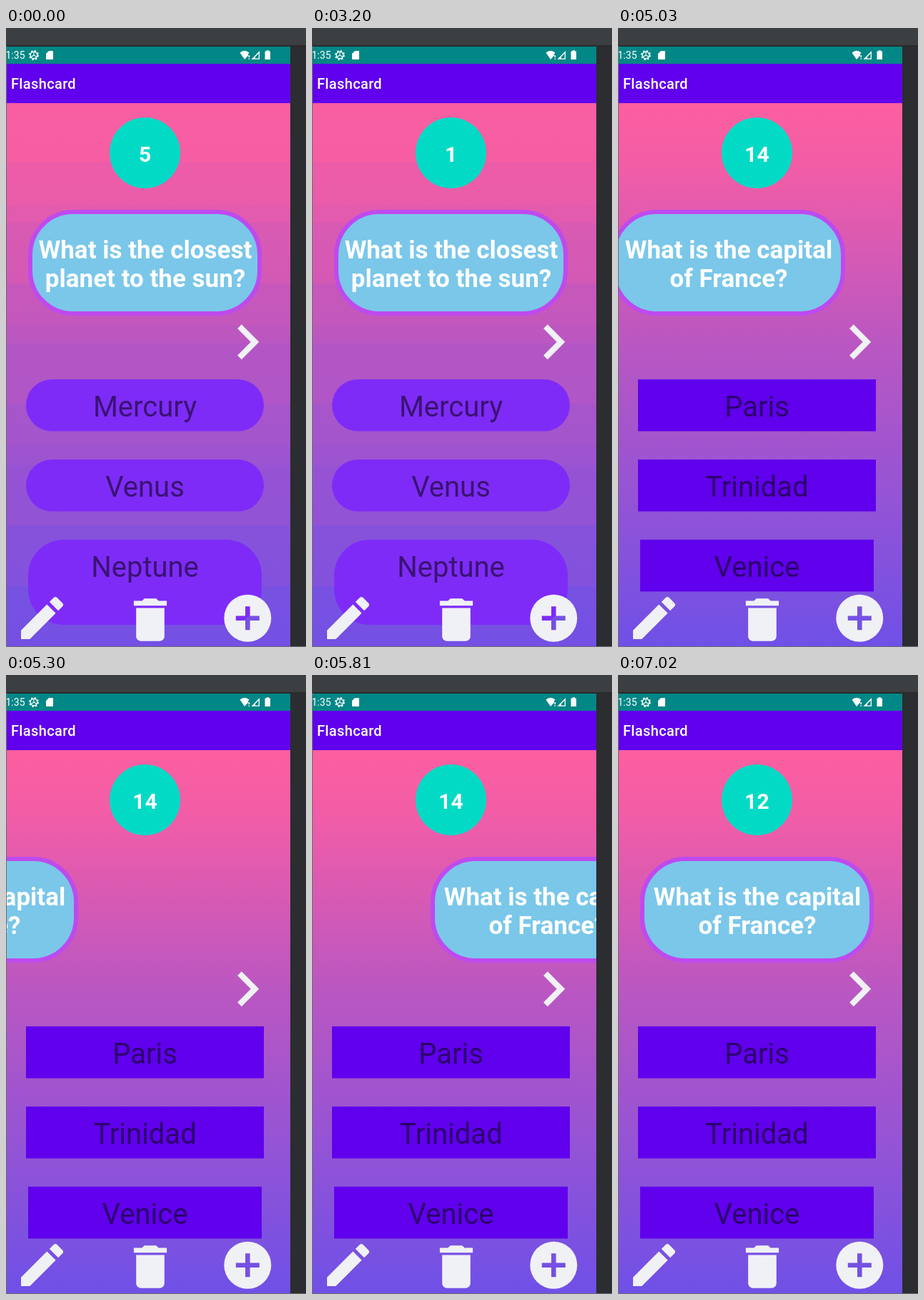
These frames come from a looping animation (420 by 865 pixels, 8000 ms). An HTML page:

```html
<!DOCTYPE html>
<html lang="en">
<head>
<meta charset="utf-8">
<title>Flashcard quiz</title>
<style>
  html, body { margin: 0; width: 100%; height: 100%; overflow: hidden; background: #2b2d30; }
  svg { display: block; width: 100%; height: 100%; }
  text { font-family: Roboto, sans-serif; }
  .mid { text-anchor: middle; }
  .bold { font-weight: 700; fill: #fff; }
  .answer { font-size: 40px; fill: #000; fill-opacity: .54; }
</style>
</head>
<body>
<svg viewBox="0 0 420 865">
  <defs>
    <linearGradient id="sky" gradientUnits="userSpaceOnUse" x1="0" y1="105" x2="0" y2="864"></linearGradient>
    <clipPath id="screen"><rect x="1" y="26" width="397" height="838"/></clipPath>
  </defs>

  <rect width="420" height="865" fill="#2b2d30"/>
  <rect width="420" height="24" fill="#3c3f41"/>
  <rect y="24" width="420" height="2" fill="#2a2a2b"/>

  <g clip-path="url(#screen)">
    <rect y="105" width="398" height="760" fill="url(#sky)"/>
    <g id="bands" opacity=".75"></g>

    <rect y="26" width="398" height="24" fill="#018786"/>
    <rect y="50" width="398" height="55" fill="#6000ec"/>
    <text x="7" y="85" font-size="20" font-weight="500" fill="#fff" letter-spacing=".35">Flashcard</text>

    <g fill="#fff">
      <text x="26.5" y="43" font-size="14" text-anchor="end">1:35</text>
      <g fill="none" stroke="#fff">
        <circle cx="39" cy="38" r="4.8" stroke-width="1.4"/>
        <circle cx="39" cy="38" r="6.2" stroke-width="1.6" stroke-dasharray="2.4 2.47"/>
        <path d="M39 38V33.500M39 38L35 40.500M39 38L43 40.500" stroke-width="1.100"/>
      </g>
      <path d="M60 32H65Q66 32 66 33V43Q66 44 65 44H57Q56 44 56 43V36Z"/>
      <path d="M327.500 34.500Q334 29 340.500 34.500L339 36.500V38.500L334 44Z"/>
      <path d="M339.500 38h1.500v3h-1.500zM339.500 42.200h1.500v1.500h-1.500z"/>
      <path d="M343.500 43.800L355 32V43.800ZM349 42.500H353.700V35.500L349 40.300Z" fill-rule="evenodd"/>
      <path d="M364.500 31.200h3.500v1.300h2v11.500h-7.500v-11.500h2z"/>
    </g>

    <circle cx="194.500" cy="174.500" r="49.500" fill="#03dac5"/>
    <text id="count" class="mid bold" x="194.500" y="186.500" font-size="30"></text>

    <g id="card">
      <rect x="34" y="257" width="321" height="142" rx="60" fill="#7ac7e9" stroke="#be4aee" stroke-width="6"/>
      <g class="mid bold" font-size="35">
        <text id="line0" x="195" y="322"></text>
        <text id="line1" x="195" y="362.300"></text>
      </g>
    </g>

    <g id="answers"></g>

    <g fill="#f0f1f5" fill-rule="evenodd">
      <path transform="translate(289 389.800) scale(4.080)" d="M10 6L8.590 7.410 13.170 12l-4.580 4.590L10 18l6-6z"/>
      <path transform="translate(11.200 785.200) scale(3.280)" d="M3 17.250V21h3.750L17.810 9.940l-3.750-3.750zM20.710 7.040c.390-.390.390-1.020 0-1.410l-2.340-2.340c-.390-.390-1.020-.390-1.410 0l-1.830 1.830 3.750 3.750z"/>
      <path transform="translate(162.400 787.400) scale(3.300)" d="M6 19c0 1.100.900 2 2 2h8c1.100 0 2-.900 2-2V7H6zM19 4h-3.500l-1-1h-5l-1 1H5v2h14z"/>
      <path transform="translate(298.700 785.100) scale(3.300)" d="M12 2a10 10 0 1 0 0 20a10 10 0 1 0 0-20zM17 13h-4v4h-2v-4H7v-2h4V7h2v4h4z"/>
    </g>
  </g>

  <path d="M.500 25V865M0 864.500H420" fill="none" stroke="#6b6d70"/>
</svg>
<script>
const LOOP = 8000, SWITCH = 5030;
const $ = id => document.getElementById(id);

function add(parent, tag, attrs, text = '') {
  const el = document.createElementNS('http://www.w3.org/2000/svg', tag);
  for (const key in attrs) el.setAttribute(key, attrs[key]);
  el.textContent = text;
  parent.append(el);
  return el;
}

// Background: gradient colours by height, and the coarse steps of the first card
const stops = [[105, 253, 95, 160], [187, 243, 93, 166], [440, 186, 87, 194], [864, 111, 80, 231]];
const edges = [105, 187, 248, 272, 357, 415, 440, 525, 583, 611, 695, 780, 864];

function skyAt(y) {
  const i = Math.max(1, stops.findIndex(s => s[0] >= y));
  const a = stops[i - 1], b = stops[i], p = (y - a[0]) / (b[0] - a[0]);
  return `rgb(${[1, 2, 3].map(c => Math.round(a[c] + (b[c] - a[c]) * p))})`;
}

for (const [y] of stops) add($('sky'), 'stop', { offset: (y - 105) / 759, 'stop-color': skyAt(y) });
edges.slice(1).forEach((end, i) => {
  const y = edges[i];
  add($('bands'), 'rect', { y, width: 398, height: end - y, fill: skyAt((y + end) / 2) });
});

const cards = [
  { lines: ['What is the closest', 'planet to the sun?'], answers: ['Mercury', 'Venus', 'Neptune'],
    fill: '#7e2bf8', radii: [36.25, 36.25, 50], lastHeight: 119 },
  { lines: ['What is the capital', 'of France?'], answers: ['Paris', 'Trinidad', 'Venice'],
    fill: '#6000ec', radii: [0, 0, 0], lastHeight: 72.5 }
];

const groups = cards.map(card => {
  const group = add($('answers'), 'g', {});
  card.answers.forEach((word, i) => {
    const y = 491 + 112 * i, last = i === 2;
    add(group, 'rect', {
      x: last ? 31 : 28, y, width: last ? 327 : 333,
      height: last ? card.lastHeight : 72.5, rx: card.radii[i], fill: card.fill
    });
    add(group, 'text', { class: 'mid answer', x: 194.5, y: y + 52 }, word);
  });
  return group;
});

// Held values: [start time, value]
const counts = [[0, 5], [260, 4], [1240, 3], [2220, 2], [3200, 1], [4210, 0],
  [SWITCH, 14], [5960, 13], [7020, 12]];
const slides = [[0, 0], [SWITCH, -40], [5150, -148], [5300, -257], [5450, -397],
  [5570, 359], [5690, 253], [5810, 135], [5960, 0]];
const held = (track, t) => track.filter(step => step[0] <= t).pop()[1];

function draw(t) {
  const n = t < SWITCH ? 0 : 1;
  $('count').textContent = held(counts, t);
  $('card').setAttribute('transform', `translate(${held(slides, t)} 0)`);
  cards[n].lines.forEach((line, i) => { $('line' + i).textContent = line; });
  groups.forEach((group, i) => group.setAttribute('visibility', i === n ? 'visible' : 'hidden'));
  $('bands').setAttribute('visibility', n ? 'hidden' : 'visible');
}

const start = performance.now();
function tick() {
  draw((performance.now() - start) % LOOP);
  requestAnimationFrame(tick);
}
tick();
</script>
</body>
</html>
```
